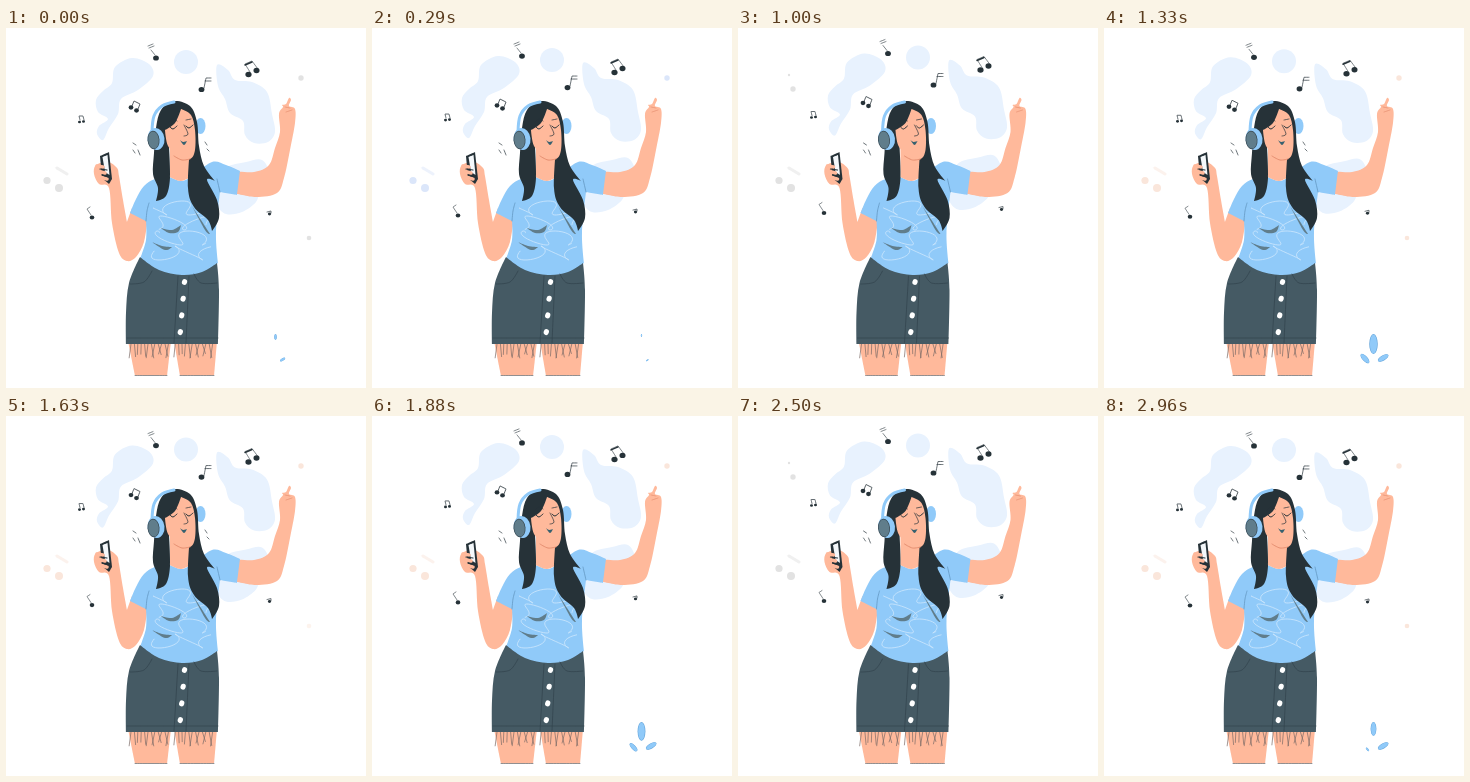
Recreate the animation shown at these times as an HTML page with a canvas. Size 360x360 px, loop 3 s.

```html
<!DOCTYPE html>
<html lang="en">
<head>
<meta charset="utf-8">
<title>Dancing to music</title>
<style>
html, body { margin: 0; width: 100%; height: 100%; overflow: hidden; background: #fff; }
canvas { display: block; width: 360px; height: 360px; }
</style>
</head>
<body>
<canvas id="stage" width="360" height="360"></canvas>
<script>
const ctx = document.getElementById("stage").getContext("2d");
const LOOP = 3000, BEAT = 1500, TAU = 2 * Math.PI;
const SKIN = "#ffb99b", DARK = "#263238", BLUE = "#90caf9", SKIRT = "#455a64", SEAM = "#32434c", GREY = "#607d8b";

// Smooth curve through points "x,y x,y!"; "!" marks a corner.
const cache = new Map();
function curve(text, closed) {
  const id = text + closed;
  if (cache.has(id)) return cache.get(id);
  const pts = text.split(" ").map(s => ({ xy: s.split(",").map(parseFloat), corner: s.endsWith("!") }));
  const n = pts.length, path = new Path2D();
  const slope = i => {
    if (pts[i].corner || (!closed && (i === 0 || i === n - 1))) return [0, 0];
    const a = pts[(i + n - 1) % n].xy, b = pts[(i + 1) % n].xy;
    return [(b[0] - a[0]) / 6, (b[1] - a[1]) / 6];
  };
  path.moveTo(...pts[0].xy);
  for (let i = 0; i < (closed ? n : n - 1); i++) {
    const j = (i + 1) % n, [x, y] = pts[i].xy, [u, v] = pts[j].xy;
    const [sx, sy] = slope(i), [ex, ey] = slope(j);
    path.bezierCurveTo(x + sx, y + sy, u - ex, v - ey, u, v);
  }
  cache.set(id, path);
  return path;
}

function fill(color, text) {
  ctx.fillStyle = color;
  ctx.fill(curve(text, true));
}

function line(color, width, ...texts) {
  ctx.strokeStyle = color;
  ctx.lineWidth = width;
  for (const text of texts) ctx.stroke(curve(text, false));
}

function oval(color, x, y, rx, ry = rx, turn = 0) {
  ctx.fillStyle = color;
  ctx.beginPath();
  ctx.ellipse(x, y, rx, ry, turn, 0, TAU);
  ctx.fill();
}

function group(dx, dy, alpha, paint) {
  ctx.save();
  ctx.translate(dx, dy);
  ctx.globalAlpha = alpha;
  paint();
  ctx.restore();
}

// 1 within `half` ms of `mid`, 0 outside, repeating every `period`.
function near(t, mid, half, period = BEAT, fade = 100) {
  const d = Math.abs((t - mid + 1.5 * period) % period - period / 2);
  const u = Math.min(1, Math.max(0, (half - d) / fade + .5));
  return u * u * (3 - 2 * u);
}

function blobs() {
  const pale = "#e8f2fe";
  fill(pale, "126,30 143,36 147,48 132,62 115,71 112,86 103,100 97,112 91,106 93,98 102,91 92,84 90,72 97,63 106,55 109,39");
  oval(pale, 180, 34, 12);
  fill(pale, "211,37 222,42 229,52 246,54 261,64 266,86 269,104 262,114 248,115 239,107 237,93 224,85 219,71 212,58");
  fill(pale, "220,140 240,134 256,132 263,146 254,162 250,174 236,184 220,186 211,176 214,158");
}

function notes() {
  const head = (x, y, r) => oval(DARK, x, y, r, r * .9);
  head(150, 30, 2.9);
  line(DARK, .6, "149,27 145,22", "142,18 147,16", "143,20 148,18");
  head(195.5, 61.5, 2.9);
  line(DARK, .7, "198,60 200,50! 205,50", "199,53 205,53");
  head(242.5, 46.5, 3.1);
  head(250.5, 42.5, 3);
  line(DARK, .6, "244,44 239,36! 246,33! 252,41");
  line(DARK, 1.5, "239,37 246,34");
  head(125, 79.5, 2.4);
  head(130.5, 82.5, 2.4);
  line(DARK, .8, "126,78 128,73! 134,76! 132,81");
  head(73.5, 94, 1.5);
  head(77.5, 93.5, 1.5);
  line(DARK, .7, "74,92 73,88! 77,88! 78,92");
  head(86, 189.5, 2.3);
  line(DARK, .6, "85,187 81,181! 84,179");
  head(263.5, 186, 1.6);
  line(DARK, .7, "265,185 265,183! 261,184");
}

function legs() {
  fill(SKIN, "122,313! 165,313! 161,348! 129,348!");
  fill(SKIN, "168,313! 211,313! 208,348! 174,348!");
  line(GREY, .7, "129,347.5 161,347.5", "174,347.5 208,347.5");
  ctx.strokeStyle = "#7b6b66";
  ctx.lineWidth = .7;
  ctx.beginPath();
  for (let x = 125; x < 210; x += 3.4) {
    if (x > 163 && x < 169) continue;
    ctx.moveTo(x, 316);
    ctx.lineTo(x + 3 * Math.sin(x), 322 + 5 * Math.abs(Math.sin(x * 2)) + 3);
  }
  ctx.stroke();
}

function arms() {
  fill(SKIN, "228,143! 248,144 263,137 269,120 274,104 273,86 277,79 276,77 280,76 283,70 285,72 283,78 289,81 289,95 284,122 278,150 271,165 250,169 228,165!");
  line("#e58e70", .7, "279,79 284,80", "280,84 286,82");
  fill(SKIN, "126,180! 142,188! 138,214 130,229 121,233 113,225 106,195 103,160 93,156 88,146 90,137 102,134 111,140 113,148 117,172 121,194!");
  fill(DARK, "94,128! 103,124! 106,151! 103,156! 96,150!");
  fill("#f4f8fb", "96.5,129! 101.5,127! 103.5,147! 99,144!");
  line(SKIN, 3.5, "91,138 97,139", "91,143 99,145", "94,149 101,151");
  line(DARK, 1.2, "94,141 101,142", "96,147 102,149");
}

function shirt() {
  fill(BLUE, "164,149! 149,151 138,158 130,171 124,185! 140,193! 140,212 134,231! 153,243 176,248 196,245 212,235! 210,205 214,164! 231,167! 234,143! 220,137 206,134 188,147! 176,153");
  ctx.strokeStyle = "#cfe8fd";
  ctx.lineWidth = .8;
  for (let i = 0; i < 4; i++) {
    ctx.beginPath();
    for (let u = 0; u <= 1; u += .02)
      ctx.lineTo(147 + 60 * u + 7 * Math.sin(u * 16 + i), 180 + 15 * i + 7 * Math.sin(u * 11 + i * 2));
    ctx.stroke();
  }
  line("#5d91bb", .7, "140,193 141,183 143,175", "214,164 211,151");
  fill(GREY, "155,200! 166,202 175,197! 172,204 163,205");
  fill(GREY, "146,214! 156,218 166,219! 159,222");
  fill(GREY, "186,178! 204,206! 199,202");
}

function skirt() {
  fill(SKIRT, "134,229! 153,242 176,247 196,244 211,235! 213,262 212,316! 120,316! 120,285 123,255");
  line(SEAM, .7, "121,310 212,310", "172,248 168,315", "183,248 180,315", "124,256 138,254 146,243", "211,255 195,255 188,246");
  for (let i = 0; i < 4; i++) oval("#fff", 178.5 - 1.4 * i, 254 + 16.7 * i, 2.6, 3, .3);
}

function head() {
  oval(BLUE, 194.5, 98, 5, 8);
  fill(SKIN, "164,118! 186,125! 186,148! 175,153 164,149!");
  fill(DARK, "168,73 184,78 191,94 193,118 198,138 209,153! 201,152 211,172 213,190 206,203! 202,192 188,179 182,160 184,120! 163,118! 164,150 160,168 150,173! 152,160 147,146 148,125 150,100 155,82");
  fill(SKIN, "175,81! 185,87 189,102 189,122 184,131 172,128 162,118 159,102! 169,95");
  line("#e58e70", 1, "168,128 176,132 184,131");
  line(DARK, 1, "164,99 167,101 171,98", "180,98 183,100 187,97");
  line(DARK, .7, "163,94 167,91 171,93", "180,92 185,91", "178,97 182,106 178,108");
  fill("#37616f", "174,112! 177,114 181,113! 178,117");
  line(BLUE, 3, "146,104 148,88 156,78 168,74");
  oval(BLUE, 150, 111, 8.5, 11, -.1);
  oval("#37474f", 147.5, 112, 6, 9.3, -.1);
  oval(GREY, 147.5, 112, 5.3, 8.6, -.1);
}

function confetti(time, t) {
  const sat = Math.max(0, 1 - near(t, 1000, 150) - near(time, 0, 15, LOOP, 30));
  const color = `hsl(${time < 1000 ? 220 : 20} ${75 * sat}% ${88.5 + 3.5 * sat}%)`;
  const dot = (x, y, r, alpha) => group(0, 0, alpha, () => oval(color, x, y, r));
  dot(41, 152.5, 3.6, 1);
  dot(53, 160, 4, 1);
  group(0, 0, .5, () => line(color, 3, "51,140 61,146"));
  dot(295, 50, 2.7, near(t, 295, 555));
  dot(303, 210, 2.3, near(t, 680, 200, BEAT / 2));
  const right = near(t, 650, 110), left = near(t, 1000, 120);
  dot(317, 108, 2.7, right);
  dot(329, 107, 2, right);
  dot(298, 200, 1.5, right);
  dot(55, 61, 2.7, left);
  dot(51, 47, 1.2, left);
}

function leaves(t) {
  const size = near(t, 530, 200, BEAT / 2, 150);
  const leaf = (x, y, length, turn, grow) => {
    ctx.save();
    ctx.translate(x, y);
    ctx.rotate(turn);
    ctx.scale(grow, grow);
    oval("#5b9ed6", 0, length, length * .42, length);
    oval(BLUE, 0, length, length * .36, length * .95);
    ctx.restore();
  };
  leaf(269.5, 306, 10, 0, size);
  leaf(265, 335, 6, 2.4, Math.max(0, 2 * size - 1));
  leaf(274, 333, 6, -2.1, Math.min(1, 1.7 * size));
}

function draw(time) {
  const t = time % BEAT;
  const lift = -3 * (1 - Math.cos(TAU * t / BEAT));
  const sway = 3.2 * near(t, 650, 120, BEAT, 160) - 1.5 * near(t, 1000, 150, BEAT, 200);
  ctx.clearRect(0, 0, 360, 360);
  ctx.lineCap = "round";
  group(0, lift, 1, blobs);
  confetti(time, t);
  group(0, lift, 1, notes);
  leaves(t);
  group(sway, 0, 1, () => {
    [legs, arms, shirt, skirt, head].forEach(part => part());
    line(DARK, .7, "127,115 130,117", "132,122 134,127", "127,122 129,125");
  });
  group(sway, 0, near(t, 0, 225), () => line(DARK, .7, "199,114 201,117", "201,121 203,123"));
}

const start = performance.now();
function tick() {
  draw((performance.now() - start) % LOOP);
  requestAnimationFrame(tick);
}
tick();
</script>
</body>
</html>
```
